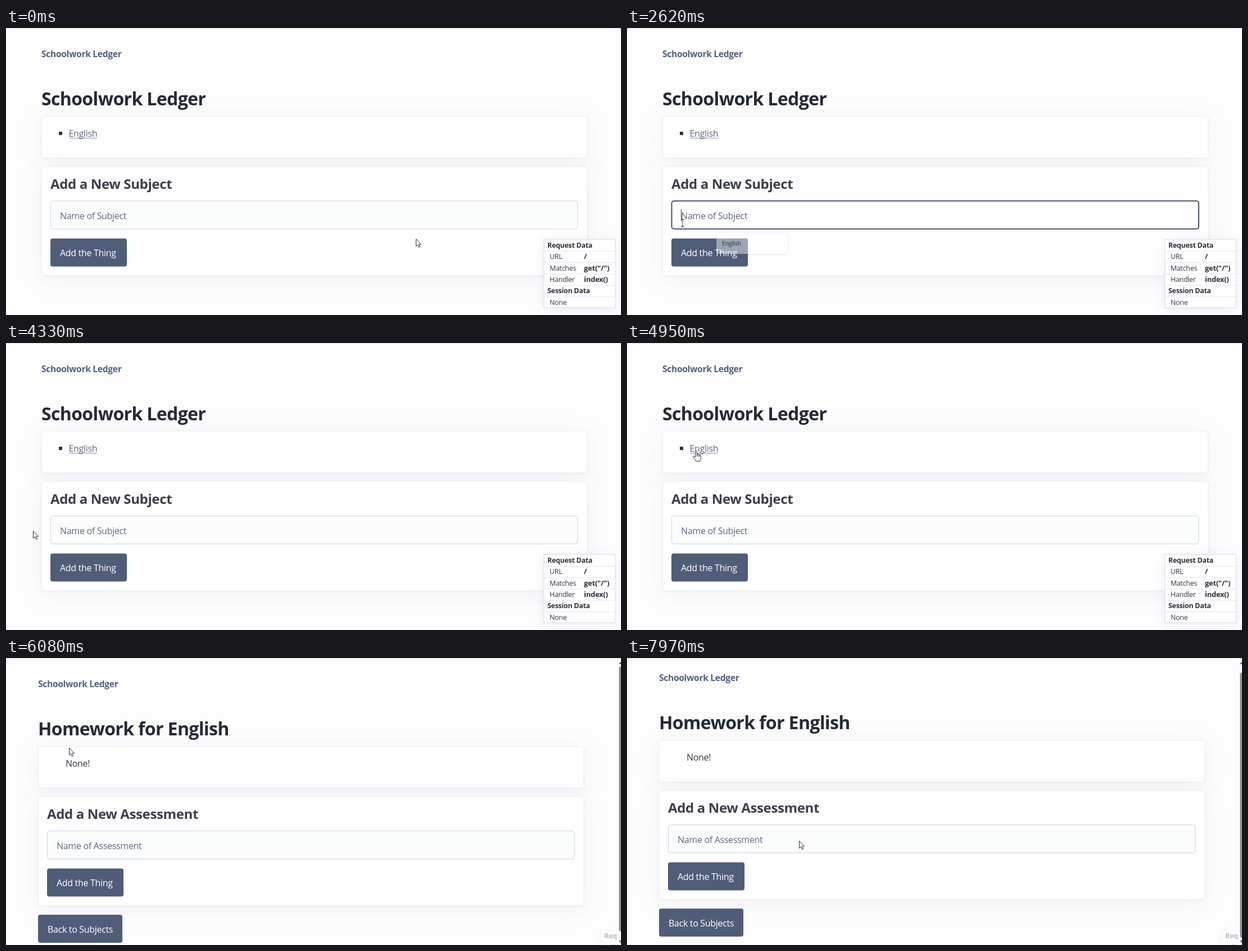
These frames come from a looping animation (1094 by 512 pixels, 8 s). An HTML page:

```html
<!DOCTYPE html>
<html lang="en">
<head>
<meta charset="utf-8">
<title>Schoolwork Ledger</title>
<style>
  html, body { margin: 0; width: 100%; height: 100%; overflow: hidden; background: #fdfdfe; }
  svg { display: block; width: 1094px; height: 512px; }
  text { font: 16px "Open Sans", "Noto Sans", sans-serif; letter-spacing: -.02em; fill: #333741; white-space: pre; }
  .brand { font-size: 15.6px; font-weight: 700; fill: #53617d; }
  .h1 { font-size: 32px; font-weight: 700; fill: #252a36; }
  .h2 { font-size: 24px; font-weight: 700; fill: #3b3f4a; letter-spacing: -.015em; }
  .hint { fill: #60697d; }
  .button { fill: #505d78; }
  .button.over { fill: #465069; }
  .label { fill: #fff; }
  .card { fill: #fefeff; stroke: #f2f2f7; filter: drop-shadow(0 1px 2px #50508010) drop-shadow(0 6px 20px #50508010); }
  .field { fill: #fbfdfd; stroke: #ced2de; }
  .field.focus { fill: #fefefe; stroke: #49526b; stroke-width: 2; }
  .link text { fill: currentColor; }
  .link path { stroke: currentColor; opacity: .7; }
  .panel rect { fill: #fefeff; stroke: #e2e5f0; stroke-width: 1.5; filter: drop-shadow(0 4px 10px #50508014); }
  .panel path { stroke: #e5e7ef; }
  .panel text { font-size: 12.4px; }
  .panel .b { font-weight: 700; fill: #2d3039; }
  .panel .value { font-size: 13px; }
  .popup { filter: drop-shadow(0 1px 2px #0004); }
  .popup text { font-size: 10.3px; font-weight: 600; }
  .status text { font-size: 9.5px; fill: #3c4350; }
  .cursor path { fill: #fff; stroke: #15161a; stroke-width: .9; stroke-linejoin: round; }
  .cursor .thin { fill: none; }
</style>
</head>
<body>
<svg viewBox="0 0 1094 512">
  <rect width="1094" height="512" fill="#fdfdfe"/>
  <g id="base">
    <text class="brand" x="63" y="52">Schoolwork Ledger</text>
    <rect class="card" x="63.5" y="158" width="970" height="73.5" rx="4"/>
    <rect class="card" x="63.5" y="247.5" width="970" height="194" rx="4"/>
    <rect id="field" class="field" x="79.5" y="308.5" width="937.5" height="50" rx="4"/>
    <rect id="add" class="button" x="79" y="375.5" width="136" height="50" rx="4"/>
    <text class="label" x="96" y="407">Add the Thing</text>
    <g id="subjects">
      <text class="h1" x="63" y="137.5">Schoolwork Ledger</text>
      <rect x="94" y="185" width="6" height="6" fill="#2f333e"/>
      <g id="link" class="link">
        <text x="111.5" y="194">English</text>
        <path d="M112 196.5H162"/>
      </g>
      <text class="h2" x="79" y="287">Add a New Subject</text>
      <text class="hint" x="96" y="341">Name of Subject</text>
    </g>
    <g id="homework">
      <text class="h1" x="63" y="137.5">Homework for English</text>
      <text x="112" y="194">None!</text>
      <text class="h2" x="79" y="287">Add a New Assessment</text>
      <text class="hint" x="96" y="341">Name of Assessment</text>
      <rect id="back" class="button" x="63" y="458" width="150" height="50" rx="4"/>
      <text class="label" x="80" y="490">Back to Subjects</text>
    </g>
  </g>
  <path id="caret" d="M96.5 323V345" stroke="#30343f"/>
  <g id="popup" class="popup">
    <rect x="159" y="366" width="127" height="37" rx="5" fill="#fff"/>
    <path d="M172 366L178 361L184 366Z" fill="#fff"/>
    <text x="169" y="388">English</text>
  </g>
  <g id="panel" class="panel"><rect x="956.7" y="377.2" width="127" height="122"/></g>
  <g id="scrollbar">
    <rect x="1088" width="6" height="512" fill="#fcfcfc"/>
    <rect id="thumb" x="1090.5" width="9" height="473" rx="4" fill="#8b8b8b"/>
    <path d="M1090 11L1095 5V11ZM1090 504H1095V510Z" fill="#666"/>
  </g>
  <g id="status" class="status">
    <rect x="-4" y="496" width="120" height="20" rx="4" fill="#d0e2fb"/>
    <text x="0" y="508">localhost:5000/subject/22</text>
  </g>
  <path d="M0 .5H1094" stroke="#dedee1"/>
  <g id="cursor" class="cursor">
    <path id="arrow" d="M.5 .5V13.3L3.4 10.6L5.4 15.2L7.5 14.3L5.6 9.9H9.4Z"/>
    <g id="hand">
      <path d="M-1.5 11V1.6a1.4 1.4 0 0 1 2.8 0V7a1.2 1.2 0 0 1 2.4 .5a1.2 1.2 0 0 1 2.4 .5a1.1 1.1 0 0 1 2.2 .5V13c0 2.5 -1.4 3.5 -1.6 6H0c-.5 -2.5 -5 -6 -5.3 -8.2c0 -1.6 1.8 -1.4 3.8 1.2Z"/>
      <path class="thin" d="M1.3 7V10.5M3.7 7.5V11M6.1 8V11"/>
    </g>
    <path id="beam" class="thin" d="M-3 -6.5H3M0 -6.5V6.5M-3 6.5H3"/>
  </g>
</svg>
<script>
  const LOOP = 8000, STEP = 70;
  const FOCUS = 2560, BLUR = 4300, CLICK = 5640, NAV = 5840, SCROLL = 7230;
  const $ = id => document.getElementById(id);
  const show = (id, on) => { $(id).style.display = on ? "" : "none"; };
  const ramp = (t, a, b) => Math.min(1, Math.max(0, (t - a) / (b - a)));
  const during = (t, a, b) => t >= a && t < b;

  const ROWS = [["Request Data"], ["URL", "/"], ["Matches", 'get("/")'], ["Handler", "index()"],
    ["Session Data"], ["None", ""]];
  $("panel").innerHTML += ROWS.map(([name, value], i) => {
    const y = 392 + 20.3 * i, head = value === undefined;
    return (i ? `<path d="M958 ${y - 14}H1083"/>` : "") +
      `<text class="${head ? "b" : ""}" x="${head ? 963 : 967}" y="${y}">${name}</text>` +
      `<text class="b value" x="1028" y="${y}">${value || ""}</text>`;
  }).join("");

  // Each pointer move: start, number of steps, where it ends.
  const MOVES = [
    [0, 0, 729, 376],
    [70, 1, 684, 351],
    [370, 5, 273, 234],
    [910, 6, 150, 187],
    [1340, 5, 180, 182],
    [1690, 2, 160, 166],
    [1830, 9, 99, 348],
    [3040, 9, 129, 396],
    [3870, 7, 48, 335],
    [4370, 5, 75, 236],
    [4740, 4, 123, 192],
    [5090, 6, 123, 195],
    [5980, 10, 92, 98],
    [6680, 4, 306, 244],
    [7550, 4, 165, 482],
    [7830, 3, 306, 326]
  ];

  function pointer(t) {
    let x = 0, y = 0;
    for (const [start, steps, toX, toY] of MOVES) {
      if (t < start) break;
      const p = steps ? Math.min(1, (Math.floor((t - start) / STEP) + 1) / steps) : 1;
      const k = p * (2 - p);
      x += (toX - x) * k;
      y += (toY - y) * k;
    }
    return [Math.round(x), Math.round(y)];
  }

  function render(t) {
    const second = t >= NAV, focused = during(t, FOCUS, BLUR), scroll = t >= SCROLL ? 11 : 0;
    show("subjects", !second);
    show("homework", second);
    show("scrollbar", second);
    $("base").setAttribute("transform", `translate(${second ? -6 : 0} ${-scroll})`);
    $("thumb").setAttribute("y", 15 + scroll);
    $("panel").setAttribute("transform", second ? "translate(101 108)" : "");
    $("panel").style.opacity = second ? .3 : 1;

    const [x, y] = pointer(t);
    const over = el => {
      const r = el.getBoundingClientRect();
      return during(x, r.left, r.right) && during(y, r.top, r.bottom);
    };
    const buttons = [$("add"), $("back")];
    buttons.forEach(b => b.classList.toggle("over", over(b)));
    const onText = !second && [...document.querySelectorAll(".h1, .h2, .field")].some(over);
    const shape = during(t, CLICK, NAV) ? "arrow"
      : [...buttons, $("link")].some(over) ? "hand"
      : onText ? "beam" : "arrow";
    for (const id of ["arrow", "hand", "beam"]) show(id, id === shape);
    $("cursor").setAttribute("transform", `translate(${x} ${y})`);

    const glow = ramp(t, 1200, 1350) - ramp(t, 1560, 1700) + ramp(t, 4960, 5150);
    $("link").style.color = `color-mix(in srgb, #393f51 ${glow * 100}%, #5f6880)`;
    $("field").classList.toggle("focus", focused);
    show("caret", focused && (t - FOCUS) % 1000 < 500 || during(t, 3500, 4000));
    $("popup").style.opacity = focused ? ramp(t, FOCUS, 2700) : 0;
    $("status").style.opacity = ramp(t, 5080, 5300) - ramp(t, NAV, 5980);
  }

  const begin = performance.now();
  function tick() {
    render((performance.now() - begin) % LOOP);
    requestAnimationFrame(tick);
  }
  tick();
</script>
</body>
</html>
```
